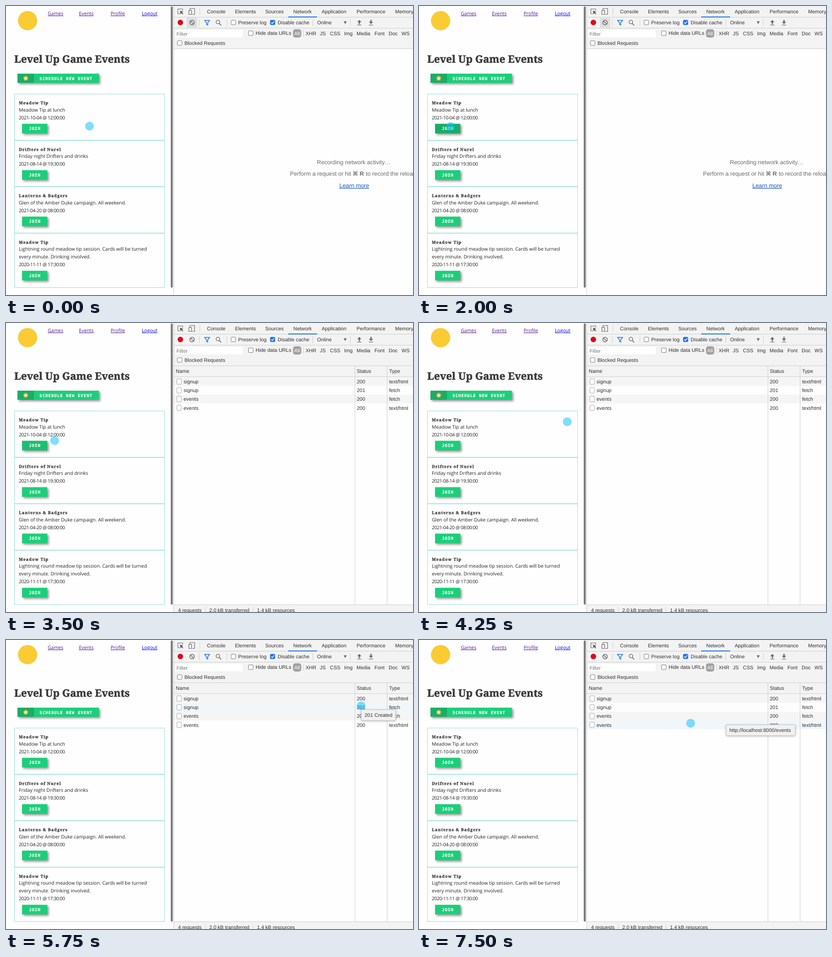
Animation of 887 by 632 pixels, one loop 8000 ms. Source, as an HTML page:

```html
<!DOCTYPE html>
<html lang="en">
<head>
<meta charset="utf-8">
<title>Game events</title>
<style>
html, body { margin: 0; width: 100%; height: 100%; overflow: hidden; background: #fefefe; }
svg { display: block; text-rendering: geometricPrecision; }
text { white-space: pre; }
.tool { font: 11px "Liberation Sans", Arial, sans-serif; fill: #303030; }
.note { font: 12.7px "Liberation Sans", Arial, sans-serif; fill: #6a6a6a; }
.strong { font-weight: bold; font-family: "Liberation Sans", "DejaVu Sans", sans-serif; }
.learn { fill: #1a55c8; text-decoration: underline; }
.muted { fill: #757575; }
.pill { fill: #fff; }
.body { font: 10.45px "Open Sans", sans-serif; fill: #222; }
.date { letter-spacing: -.5px; }
.link { fill: #551a8b; text-decoration: underline; }
.fresh { fill: #0000ee; }
.title { font: bold 9px "Noto Serif", serif; letter-spacing: .95px; fill: #333; stroke: #333; stroke-width: .25px; }
.h1 { font: bold 22.4px "Noto Serif", serif; fill: #3a3a3c; stroke: #3a3a3c; stroke-width: .6px; }
.label { font: bold 9px "DejaVu Sans Mono", monospace; letter-spacing: 1px; fill: #fff; stroke: #fff; stroke-width: .2px; }
.lift { filter: drop-shadow(3px 3px 2.5px rgba(0, 0, 0, .42)); }
.tip { filter: drop-shadow(0 1px 2px rgba(0, 0, 0, .28)); }
</style>
</head>
<body>
<svg id="stage" width="887" height="632" viewBox="0 0 887 632"></svg>
<script>
const GREEN = '#1bcf7a', MID_GREEN = '#1abf71', DARK_GREEN = '#18ae67';
const BAR = '#f3f3f3', RULE = '#cdcdcd';
const ROW_TOP = 118.4, ROW_HEIGHT = 19.2;

const text = (x, y, words, cls = 'tool') => `<text x="${x}" y="${y}" class="${cls}">${words}</text>`;
const box = (x, y, w, h, fill, more = '') =>
  `<rect x="${x}" y="${y}" width="${w}" height="${h}" fill="${fill}" ${more}/>`;
const path = (d, stroke, more = '') => `<path d="${d}" fill="none" stroke="${stroke}" ${more}/>`;
const hline = (y, x = 366) => box(x, y, 887 - x, 1, RULE);
const vline = (x, y, h) => box(x, y, 1, h, RULE);
const group = (id, content) => `<g id="${id}">${content}</g>`;

function star(cx, cy, outer, inner, points, fill) {
  const corners = Array.from({ length: points * 2 }, (_, i) => {
    const r = i % 2 ? inner : outer, a = i * Math.PI / points - Math.PI / 2;
    return `${(cx + r * Math.cos(a)).toFixed(2)},${(cy + r * Math.sin(a)).toFixed(2)}`;
  });
  return `<polygon points="${corners.join(' ')}" fill="${fill}"/>`;
}

function checkbox(cx, cy, checked) {
  const frame = box(cx - 5, cy - 5, 10, 10, checked ? '#1a73e8' : '#fff',
    `rx="1.5" stroke="${checked ? '#1a73e8' : '#777'}"`);
  return frame + (checked ? path(`M${cx - 3} ${cy}l2.3 2.5 4-5`, '#fff', 'stroke-width="1.6"') : '');
}

function card(top, height, title, lines, date, id) {
  const last = top + 38.5 + lines.length * 17;
  return box(18.5, top, 327, height, 'none', 'stroke="#72d5cd" stroke-opacity=".75"') +
    text(28, top + 22.5, title, 'title') +
    lines.map((line, i) => text(28, top + 38 + i * 17, line, 'body')).join('') +
    text(28, last - .5, date, 'body date') +
    box(35, last + 9.6, 55, 21, GREEN, `class="lift" id="${id}"`) +
    text(50, last + 23.2, 'JOIN', 'label');
}

function page() {
  const links = [[91, 'Games'], [159, 'Events'], [228, 'Profile'], [296, 'Logout']];
  return '<circle cx="47" cy="32" r="21" fill="#fbcb34"/>' +
    links.map(([x, name]) => text(x, 20, name, 'body link' + (name === 'Logout' ? ' fresh' : ''))).join('') +
    text(18, 123.5, 'Level Up Game Events', 'h1') +
    box(25, 148, 177.5, 20, GREEN, 'class="lift"') + box(25, 148, 36, 20, DARK_GREEN) +
    star(43, 158, 6.8, 3.4, 10, '#e8a33a') + star(43, 158.3, 5.8, 2.7, 5, '#ffe27a') +
    text(73, 161.5, 'SCHEDULE NEW EVENT', 'label') +
    card(192.5, 101, 'Meadow Tip', ['Meadow Tip at lunch'], '2021-10-04 @ 12:00:00', 'join') +
    card(294, 101, 'Drifters of Nurel', ['Friday night Drifters and drinks'], '2021-08-14 @ 19:30:00', 'join2') +
    card(395.5, 101, 'Lanterns &amp; Badgers', ['Glen of the Amber Duke campaign. All weekend.'],
      '2021-04-20 @ 08:00:00', 'join3') +
    card(497, 118.5, 'Meadow Tip',
      ['Lightning round meadow tip session. Cards will be turned', 'every minute. Drinking involved.'],
      '2020-11-11 @ 17:30:00', 'join4') +
    box(359, 1, 4.5, 615, '#7d7d7d', 'rx="2.2"');
}

function toolbar() {
  const tabs = [[438, 'Console'], [499, 'Elements'], [565, 'Sources'], [626, 'Network'],
    [688, 'Application'], [764, 'Performance'], [848, 'Memory']];
  const kinds = [[653, 'XHR'], [684, 'JS'], [706, 'CSS'], [737, 'Img'], [764, 'Media'],
    [803, 'Font'], [834, 'Doc'], [862, 'WS']];
  const arrow = (x, up) => `<path d="M${x - 4.5} ${up ? 35.5 : 34.5}h9l-4.5 ${up ? -5 : 5}z" fill="#666"/>` +
    box(x - 1.2, up ? 35 : 30, 2.4, 5, '#666') + box(x - 4.5, 41, 9, 1.2, '#666');
  return box(366, 0, 521, 93, BAR) + hline(24) + hline(48) + hline(93) +
    box(615, 23, 63, 2, '#1a73e8') +
    // inspect and device icons
    path('M380 17h-5.5v-10.5h10.5v4', '#666', 'stroke-width="1.1"') +
    '<path d="M379 10l7.5 3-3 1.2 2.8 3-1.3 1.2-2.8-3-1.5 2.6z" fill="#555"/>' +
    path('M401 9v-3.5h10v13h-5M398.5 9.5h6v9h-6z', '#666', 'stroke-width="1.2"') +
    vline(422, 5, 14) +
    tabs.map(([x, name]) => text(x, 16, name)).join('') +
    // recording controls
    '<circle cx="380" cy="36" r="6" fill="#e0061a"/>' +
    box(394, 26, 22.5, 21, '#dedede', 'id="clearHover"') +
    '<circle cx="405.5" cy="36.3" r="5" fill="none" stroke="#636363" stroke-width="1.5"/>' +
    path('M402 32.8l7 7', '#636363', 'stroke-width="1.5"') + vline(421, 29, 15) +
    path('M432.8 31.5h11l-4.2 5.2v5l-2.6-1.5v-3.5z', '#1a73e8', 'stroke-width="1.5"') +
    '<circle cx="461.8" cy="35" r="3.9" fill="none" stroke="#636363" stroke-width="1.4"/>' +
    path('M464.6 38l4.3 4.3', '#636363', 'stroke-width="1.7"') + vline(481, 29, 15) +
    checkbox(495.5, 36) + text(506, 40, 'Preserve log') +
    checkbox(581, 36, true) + text(592, 40, 'Disable cache') + vline(668, 29, 15) +
    text(678, 40, 'Online') + '<path d="M736 33.5h6.5l-3.2 6z" fill="#666"/>' + vline(750, 29, 15) +
    arrow(770, true) + arrow(795.5, false) +
    // filters
    box(369, 52, 147, 16.5, '#fff') + text(371.5, 64.5, 'Filter', 'tool muted') +
    checkbox(533.5, 59.5) + text(544, 63, 'Hide data URLs') +
    box(625.5, 51, 18, 18, '#a0a0a0', 'rx="5"') + text(628.3, 64, 'All', 'tool pill') + vline(648, 53, 14) +
    kinds.map(([x, name]) => text(x, 64, name)).join('') +
    checkbox(378.5, 81) + text(389, 85, 'Blocked Requests');
}

const emptyNote =
  text(677.5, 346, 'Recording network activity…', 'note') +
  text(619, 371, 'Perform a request or hit', 'note') + text(755.5, 371, '⌘ R', 'note strong') +
  text(784, 371, 'to record the reload.', 'note') +
  text(726.5, 397, 'Learn more', 'note learn');

function requests() {
  const rows = [['signup', '200', 'text/html'], ['signup', '201', 'fetch'],
    ['events', '200', 'fetch'], ['events', '200', 'text/html']];
  const rowBox = (i, fill, more) => box(366, ROW_TOP + i * ROW_HEIGHT, 521, ROW_HEIGHT, fill, more);
  const cells = ([name, status, type], i) => {
    const y = 132 + i * ROW_HEIGHT;
    return box(372.5, y - 10, 9.5, 12, '#fff', 'rx="1" stroke="#a5a5a5"') +
      text(387, y, name) + text(764.5, y, status) + text(835, y, type);
  };
  return box(366, 94, 521, 24, BAR) + hline(117) +
    text(370, 109, 'Name') + text(764.5, 109, 'Status') + text(835, 109, 'Type') +
    rowBox(0, '#f5f5f5') + rowBox(2, '#f5f5f5') + rowBox(0, '#f1f6fa', 'id="rowHover"') +
    vline(760, 94, 522) + vline(830, 94, 522) + rows.map(cells).join('') +
    box(366, 616, 521, 16, BAR) + hline(615.5) +
    text(375, 632, '4 requests') + vline(434, 621, 11) +
    text(443, 632, '2.0 kB transferred') + vline(538, 621, 11) + text(547, 632, '1.4 kB resources');
}

const tooltip = (w, words) =>
  box(.5, .5, w, 23.5, '#f1f1f1', 'class="tip" rx="1.5" stroke="#c4c4c4"') + text(7.5, 16, words);

document.getElementById('stage').innerHTML =
  page() + group('empty', emptyNote) + group('table', requests()) + toolbar() + vline(365, 0, 632) +
  '<circle id="pointer" r="9.6" fill="#00beff" fill-opacity=".5"/>' +
  '<circle id="ring" cx="68" cy="274" fill="none" stroke="#62cdf5" stroke-width="2"/>' +
  group('urlTip', tooltip(150.5, 'http://localhost:8000/events')) +
  group('statusTip', tooltip(74.5, '201 Created'));

// Pointer steps: start time, x, y, hovered row, tooltip id, tooltip x, tooltip y
const STEPS = [
  [0, 182, 262.7], [750, 155.5, 263], [1000, 128.5, 263.4], [1250, 102.7, 264],
  [1500, 80.5, 266], [1750, 69, 265], [2000, 69, 263.5],
  [2500, null], [3250, 68, 264],
  [3500, 106, 257], [3750, 193, 236], [4000, 320, 216], [4250, 323, 216],
  [4500, 595, 176, 3],
  [4750, 659, 166.5, 2, 'urlTip', 595, 181],
  [5000, 691, 154, 2, 'urlTip', 595, 181],
  [5250, 716, 146, 1], [5500, 769, 142, 1],
  [5750, 774, 144, 1, 'statusTip', 774, 152],
  [7000, 767, 146, 1, 'statusTip', 774, 152],
  [7250, 717, 157, 1],
  [7500, 592, 182, 3, 'urlTip', 669, 185]
];
// The hovered button darkens and lightens in two stages
const BUTTON = [[0, GREEN], [1500, MID_GREEN], [1750, DARK_GREEN], [3500, MID_GREEN], [3750, GREEN]];
const LOOP = 8000, LOADED = 2500;

const part = id => document.getElementById(id);
const show = (id, on) => { part(id).style.display = on ? '' : 'none'; };
const stepAt = (steps, t) => steps.filter(step => step[0] <= t).pop();

function draw(now) {
  const t = now % LOOP;
  const [, x, y, row, tip, tipX, tipY] = stepAt(STEPS, t);
  const pressed = x === null;

  show('empty', t < LOADED);
  show('clearHover', t < LOADED);
  show('table', t >= LOADED);
  part('join').setAttribute('fill', stepAt(BUTTON, t)[1]);

  show('pointer', !pressed);
  if (!pressed) part('pointer').setAttribute('transform', `translate(${x} ${y})`);
  show('ring', pressed);
  part('ring').setAttribute('r', t < 2750 ? 11 : 11.6);
  part('ring').setAttribute('stroke-opacity', t < 2750 ? .4 : t < 3000 ? .3 : .45);

  show('rowHover', row !== undefined);
  if (row !== undefined) part('rowHover').setAttribute('y', ROW_TOP + row * ROW_HEIGHT);
  for (const id of ['urlTip', 'statusTip']) show(id, id === tip);
  if (tip) part(tip).setAttribute('transform', `translate(${tipX} ${tipY})`);
}

const start = performance.now();
(function tick() {
  draw(Math.max(0, performance.now() - start));
  requestAnimationFrame(tick);
})();
</script>
</body>
</html>
```
